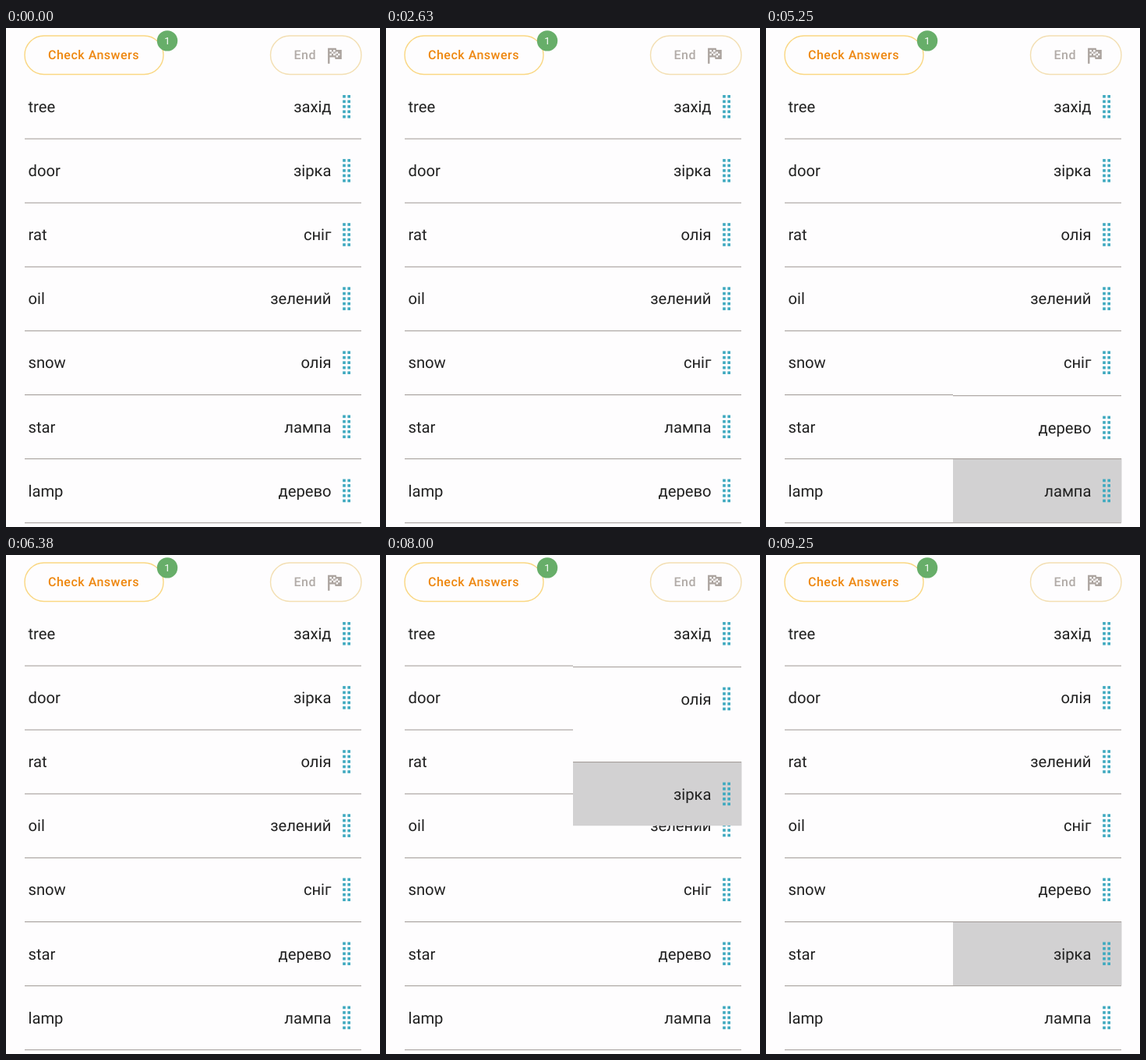
Recreate the animation shown at these times as an HTML page. Size 480 by 640 pixels, loop 9.38 s.

```html
<!DOCTYPE html>
<html lang="en">
<head>
<meta charset="utf-8">
<title>Match the words</title>
<style>
  html, body { margin: 0; width: 100%; height: 100%; overflow: hidden; background: #fefdfe; }
  svg { display: block; width: 480px; height: 640px; font-family: Roboto, sans-serif; }
  .word { font-size: 20.2px; fill: #212121; text-rendering: geometricPrecision; }
  .btn { font-size: 16px; font-weight: 500; letter-spacing: .5px; text-rendering: geometricPrecision; }
  .line { fill: #9f9894; }
  .dots { fill: #3ea9bf; }
</style>
</head>
<body>
<svg id="stage" viewBox="0 0 480 640">
  <rect width="480" height="640" fill="#fefdfe"/>
  <rect x="24" y="10" width="178" height="49.5" rx="24.75" fill="none" stroke="#fad782" stroke-width="1.4"/>
  <text class="btn" x="54" y="40" fill="#ee870f">Check Answers</text>
  <circle cx="207" cy="16.4" r="13.2" fill="#67ae69"/>
  <text x="207" y="21" font-size="13" fill="#fff" text-anchor="middle">1</text>
  <rect x="339.5" y="10" width="116.5" height="49.5" rx="24.75" fill="none" stroke="#f3dfb2" stroke-width="1.4"/>
  <text class="btn" x="369.5" y="40" fill="#b1aba7">End</text>
  <path transform="translate(407.2 21) scale(1.18)" fill="#aca49f" d="M14.4 6H20V16H13L12.6 14H7V21H5V4H14ZM14 14H16V12H18V10H16V8H14V10L13 8V6H11V8H9V6H7V8H9V10H7V12H9V10H11V12H13V10L14 12ZM11 10V8H13V10ZM14 10H16V12H14Z"/>
  <g id="left"></g>
  <g id="right"></g>
</svg>
<script>
const LOOP = 9380, STEP = 125, ROW = 82.1, TOP = 59.5, SHIFT = 340;
const english = ['tree', 'door', 'rat', 'oil', 'snow', 'star', 'lamp'];
const ukrainian = ['захід', 'зірка', 'сніг', 'зелений', 'олія', 'лампа', 'дерево'];

// Each drag goes down the list; on drop the two end words trade places.
const drags = [
  { from: 2, to: 4, start: 415, time: 1215, drop: 1875 },
  { from: 5, to: 6, start: 4650, time: 600, drop: 5500 },
  { from: 1, to: 5, start: 7375, time: 1500, drop: LOOP }
];

function add(parent, tag, attrs, text) {
  const el = document.createElementNS('http://www.w3.org/2000/svg', tag);
  for (const k in attrs) el.setAttribute(k, attrs[k]);
  if (text) el.textContent = text;
  return parent.appendChild(el);
}

const left = document.getElementById('left');
const right = document.getElementById('right');
const addLine = (parent, x, y) =>
  add(parent, 'rect', { class: 'line', x, y, width: 216, height: 1 });

english.forEach((word, i) => {
  const y = TOP + i * ROW;
  add(left, 'text', { class: 'word', x: 28.5, y: y + 48.5 }, word);
  addLine(left, 24, y + ROW);
});
addLine(right, 240, TOP + 7 * ROW);

const items = ukrainian.map((word, i) => {
  const g = add(right, 'g', {});
  const box = add(g, 'rect', { x: 240, y: 0, width: 216.5, height: ROW, fill: '#d2d1d2' });
  if (i) addLine(g, 240, 0);
  add(g, 'text', { class: 'word', x: 417.5, y: 48.5, 'text-anchor': 'end' }, word);
  const dots = add(g, 'g', { class: 'dots' });
  for (let n = 0; n < 10; n++) {
    add(dots, 'rect', {
      x: 432.2 + n % 2 * 6.2, y: 26.5 + Math.floor(n / 2) * 6.5, width: 3.6, height: 3.6
    });
  }
  return { g, box, dots };
});

const clamp = v => Math.max(0, Math.min(1, v));
const smooth = u => u * u * (3 - 2 * u);
const unsmooth = p => .5 - Math.sin(Math.asin(1 - 2 * p) / 3);
const easeOut = u => 1 - (1 - u) * (1 - u);

function draw(t) {
  const order = items.slice();
  let active = null;
  for (const d of drags) {
    if (t >= d.drop) [order[d.from], order[d.to]] = [order[d.to], order[d.from]];
    else if (t >= d.start) active = d;
  }
  order.forEach((item, slot) => {
    let pos = slot, held = false;
    if (active) {
      const { from, to, start, time } = active, span = to - from;
      held = slot === from;
      if (held) pos += span * smooth(clamp((t - start) / time));
      else if (slot > from && slot <= to) {
        // A neighbour gives way once the held row is half across it.
        const begin = start + time * unsmooth((slot - from - .5) / span);
        pos -= easeOut(clamp((t - begin) / SHIFT));
      }
    }
    item.g.setAttribute('transform', `translate(0 ${(TOP + pos * ROW).toFixed(2)})`);
    item.box.setAttribute('visibility', held ? 'visible' : 'hidden');
    item.dots.setAttribute('opacity', held && t - active.start < STEP ? .12 : 1);
    if (held && right.lastChild !== item.g) right.appendChild(item.g);
  });
}

const origin = performance.now();
function tick() {
  const t = (performance.now() - origin) % LOOP;
  draw(Math.floor(Math.floor(t / 10) * 10 / STEP) * STEP);
  requestAnimationFrame(tick);
}
tick();
</script>
</body>
</html>
```
